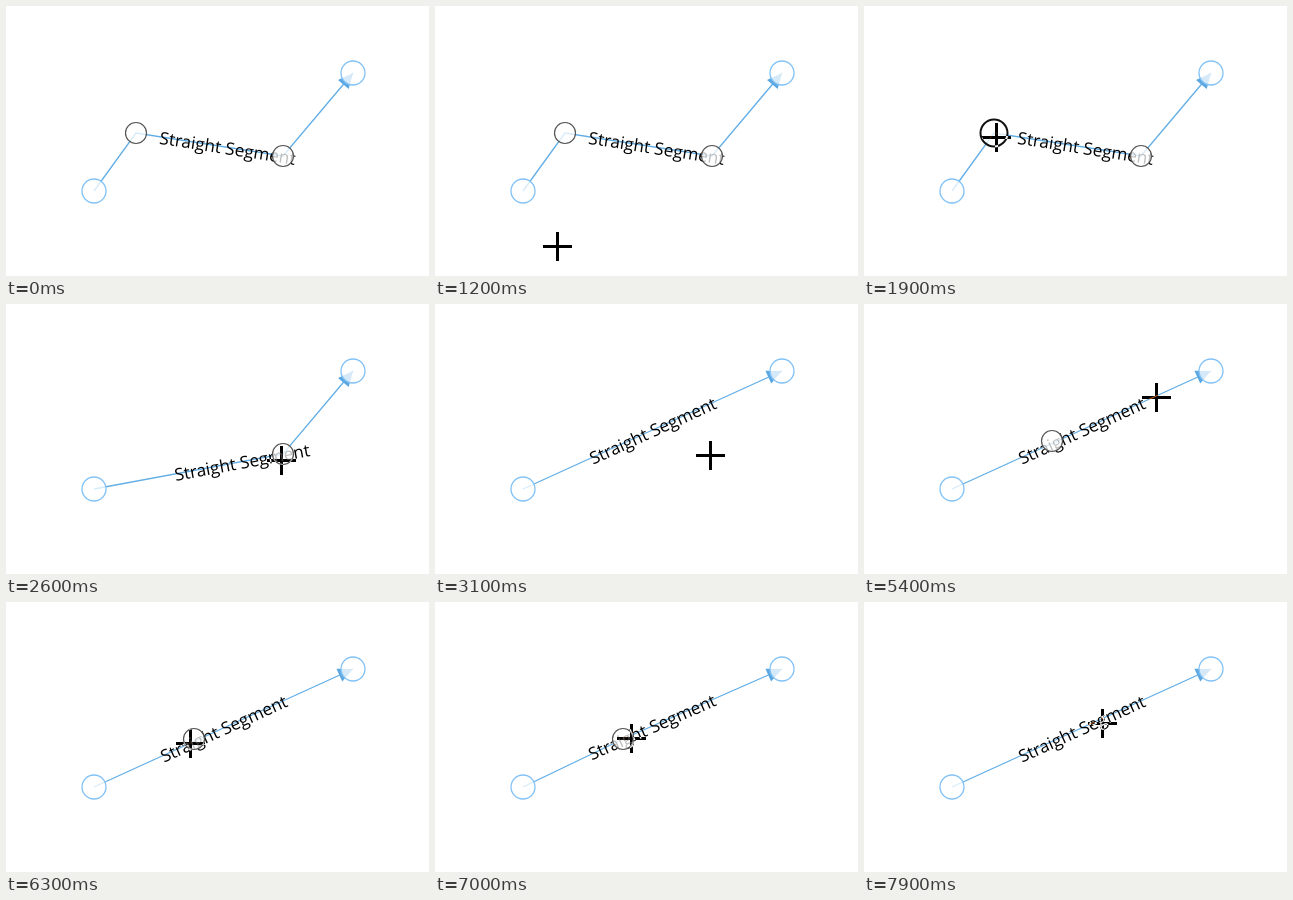
Recreate the animation shown at these times as an HTML page with a canvas. Size 423 by 270 pixels, loop 8 s.

```html
<!DOCTYPE html>
<html lang="en">
<head>
<meta charset="utf-8">
<title>Straight segment editing</title>
<style>
html, body { margin: 0; width: 100%; height: 100%; overflow: hidden; background: #fff; }
canvas { display: block; }
</style>
</head>
<body>
<canvas id="stage" width="423" height="270"></canvas>
<script>
const ctx = document.getElementById('stage').getContext('2d');
const LOOP = 8000, STEP = 100;
const START = [88, 185], END = [347, 67];
const LEFT = [130, 127], RIGHT = [277, 150], ADDED = [188, 137];
const BLUE = '#62aee6';

// Pointer glides: each moves from the last resting place to the given one
const ENTRY = [120, 262];
const glides = [
  { from: 1100, to: 1700, rest: [132, 131] },
  { from: 2100, to: 2400, rest: [275, 159] },
  { from: 2500, to: 2800, rest: [275, 151] },
  { from: 3300, to: 4100, rest: [184, 140] },
  { from: 4300, to: 5300, rest: [292, 93] },
  { from: 5700, to: 5800, rest: [292, 114] },
  { from: 5900, to: 6300, rest: [184, 141] },
  { from: 6400, to: 7000, rest: [196, 136] },
  { from: 7400, to: 7900, rest: [238, 121] }
];

function pointerAt(t) {
  let place = ENTRY;
  for (const { from, to, rest } of glides) {
    if (t < from) break;
    const f = Math.min(1, (t - from) / (to - from));
    place = place.map((v, i) => Math.round(v + (rest[i] - v) * f));
  }
  return place;
}

// Bends shape the line; handles are the dark circles shown on it
function sceneAt(t) {
  if (t < 2000) return { bends: [LEFT, RIGHT], handles: [LEFT, RIGHT], active: t >= 1900 && LEFT };
  if (t < 3100) return { bends: [RIGHT], handles: [RIGHT], active: t >= 3000 && RIGHT };
  const shown = t >= 4100 && t < 7500;
  return { bends: shown && t >= 6600 ? [ADDED] : [], handles: shown ? [ADDED] : [] };
}

function midpoint(points) {
  const parts = points.slice(1).map((b, i) => {
    const a = points[i], dx = b[0] - a[0], dy = b[1] - a[1];
    return { a, dx, dy, len: Math.hypot(dx, dy) };
  });
  let rest = parts.reduce((sum, p) => sum + p.len, 0) / 2;
  for (const p of parts) {
    if (rest <= p.len) {
      const f = rest / p.len;
      return { x: p.a[0] + p.dx * f, y: p.a[1] + p.dy * f, angle: Math.atan2(p.dy, p.dx) };
    }
    rest -= p.len;
  }
}

function drawLine(points) {
  ctx.strokeStyle = BLUE;
  ctx.lineWidth = 1.3;
  ctx.beginPath();
  points.forEach(p => ctx.lineTo(...p));
  ctx.stroke();

  const [from, tip] = points.slice(-2);
  ctx.save();
  ctx.translate(...tip);
  ctx.rotate(Math.atan2(tip[1] - from[1], tip[0] - from[0]));
  ctx.fillStyle = '#5aa7e2';
  ctx.beginPath();
  ctx.moveTo(0, 0);
  ctx.lineTo(-15, -7);
  ctx.lineTo(-15, 7);
  ctx.fill();
  ctx.restore();
}

function drawLabel({ x, y, angle }) {
  ctx.save();
  ctx.translate(x, y);
  ctx.rotate(angle);
  ctx.font = '17.2px "Open Sans", "Noto Sans", sans-serif';
  ctx.textAlign = 'center';
  ctx.fillStyle = '#000';
  ctx.fillText('Straight Segment', 0, 7);
  ctx.restore();
}

function drawHandle([x, y], radius, color, width) {
  ctx.beginPath();
  ctx.arc(x, y, radius, 0, Math.PI * 2);
  ctx.fillStyle = 'rgba(255,255,255,.75)';
  ctx.fill();
  ctx.strokeStyle = color;
  ctx.lineWidth = width;
  ctx.stroke();
}

// The cross inverts whatever lies beneath it
function drawPointer([x, y]) {
  ctx.globalCompositeOperation = 'difference';
  ctx.fillStyle = '#fff';
  ctx.beginPath();
  ctx.rect(x - 14, y - 1, 29, 3);
  ctx.rect(x - 1, y - 14, 3, 29);
  ctx.fill();
  ctx.globalCompositeOperation = 'source-over';
}

function draw(now) {
  const t = Math.floor(now % LOOP / STEP) * STEP;
  const { bends, handles, active } = sceneAt(t);
  const points = [START, ...bends, END];
  ctx.fillStyle = '#fff';
  ctx.fillRect(0, 0, 423, 270);
  drawLine(points);
  drawLabel(midpoint(points));
  for (const p of [START, END]) drawHandle(p, 12, '#82c2f6', 1.3);
  for (const p of handles) {
    if (p === active) drawHandle(p, 13.5, '#111', 2);
    else drawHandle(p, 10.5, '#555', 1.2);
  }
  if (t >= glides[0].from) drawPointer(pointerAt(t));
}

let begin;
function tick(now) {
  begin ??= now;
  draw(now - begin);
  requestAnimationFrame(tick);
}
draw(0);
requestAnimationFrame(tick);
</script>
</body>
</html>
```
